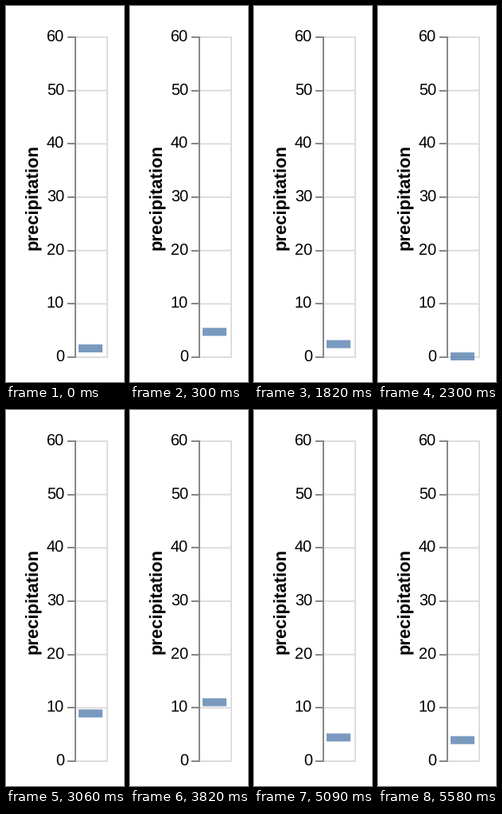
A matplotlib script that plays this animation: 148 px wide and 470 px high, repeating every 5790 ms.

```python
import numpy as np
import matplotlib.pyplot as plt
from matplotlib.animation import FuncAnimation
from matplotlib.patches import Rectangle

W, H, DPI = 148, 470, 100
LOOP_MS, STEP_MS = 5790, 10
LEFT, RIGHT, BASE = 87, 127, 439
PX_PER_UNIT = 400 / 60
GRID, AXIS, BAR = "#dddddd", "#888888", "#4c78a8"

# (start in ms, precipitation)
STEPS = [
    (0, 1.5), (60, 0), (300, 4.6), (550, 0.3), (820, 0), (1820, 2.3),
    (2090, 0.5), (2300, 0), (3060, 8.8), (3300, 1.7), (3820, 10.9),
    (4090, 6.6), (4360, 0), (5090, 4.3), (5360, 10.7), (5580, 3.8),
]
STARTS = np.array([start for start, _ in STEPS])

plt.rcParams.update({"font.family": "Liberation Sans", "text.hinting": "none"})


def pt(px):
    return px * 72 / DPI


fig = plt.figure(figsize=(W / DPI, H / DPI), dpi=DPI, facecolor="white")
ax = fig.add_axes([0, 0, 1, 1])
ax.set_xlim(0, W)
ax.set_ylim(H, 0)
ax.axis("off")


def line(x0, y0, x1, y1, color):
    ax.plot([x0, x1], [y0, y1], color=color, lw=pt(2), snap=False,
            solid_capstyle="projecting" if x0 == x1 else "butt", zorder=1)


def value_to_y(value):
    return BASE - value * PX_PER_UNIT


levels = range(0, 61, 10)
for v in levels:
    line(LEFT, value_to_y(v), RIGHT, value_to_y(v), GRID)
line(RIGHT, value_to_y(60), RIGHT, BASE, GRID)

for v in levels:
    y = round(value_to_y(v))
    line(LEFT - 10, y, LEFT, y, AXIS)
    ax.text(LEFT - 14, y + 6, str(v), size=pt(20), ha="right", va="baseline")
line(LEFT, value_to_y(60), LEFT, BASE, AXIS)

ax.text(40, 239, "precipitation", size=pt(22), weight="bold", rotation=90,
        rotation_mode="anchor", ha="center", va="baseline")

tick = Rectangle((91, 0), 30, 10, facecolor=BAR, alpha=0.75, lw=0,
                 snap=False, zorder=3)
ax.add_patch(tick)


def update(i):
    now = i * STEP_MS
    value = STEPS[np.searchsorted(STARTS, now, side="right") - 1][1]
    tick.set_y(value_to_y(value) - 6)
    return [tick]


anim = FuncAnimation(fig, update, frames=LOOP_MS // STEP_MS,
                     interval=STEP_MS, init_func=lambda: update(0),
                     repeat=True, repeat_delay=0, blit=True)
plt.show()
```
